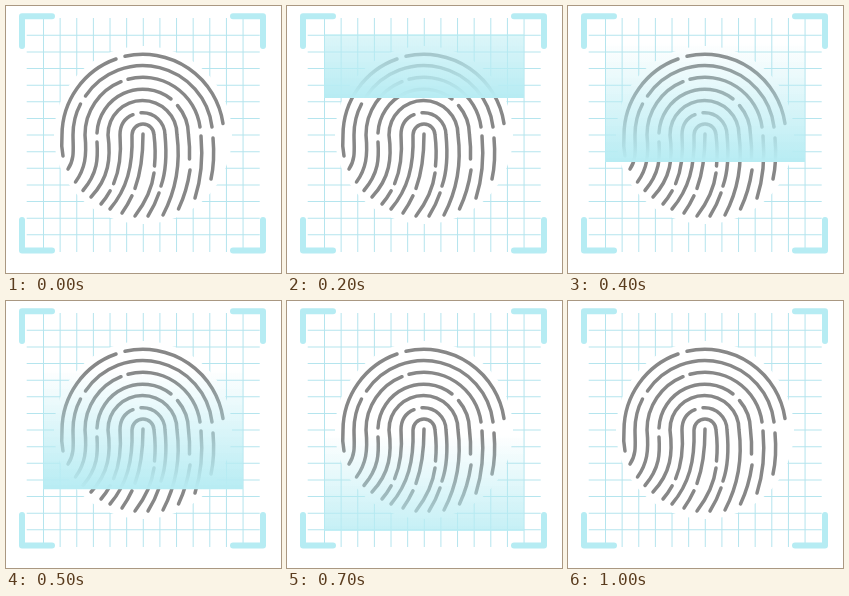
Write an HTML page that moves like this. It is 275x267 px and loops after 1200 ms.

```html
<!DOCTYPE html>
<html lang="en">
<head>
<meta charset="utf-8">
<title>Fingerprint scan</title>
<style>
  html, body { margin: 0; width: 100%; height: 100%; overflow: hidden; background: #fff; }
  svg { position: absolute; left: 0; top: 0; width: 275px; height: 267px; }
  path { fill: none; }
  .grid { stroke: #b5e5ee; }
  .corners { stroke: #b6ecf3; stroke-width: 6; stroke-linecap: round; stroke-linejoin: round; }
  .ridges { stroke: #878787; stroke-width: 3.5; stroke-linecap: round; }
  .window { position: absolute; left: 37px; top: 28px; width: 200px; height: 202px; overflow: hidden; }
  .beam {
    position: absolute; left: 0; top: -121.5px; width: 100%; height: 120px;
    background: linear-gradient(rgba(183, 236, 243, 0), rgb(183, 236, 243));
    animation: scan 1.2s steps(12, end) infinite;
  }
  @keyframes scan { to { transform: translateY(387px); } }
</style>
</head>
<body>
<svg viewBox="0 0 275 267">
  <!-- wide dashed strokes form the grid lines -->
  <g class="grid">
    <path d="M37 129H238" stroke-width="234" stroke-dasharray="1 15.63"/>
    <path d="M137.2 28.8V229.8" stroke-width="233" stroke-dasharray="1 15.63"/>
  </g>
  <circle cx="137" cy="129" r="89" fill="#fff"/>
  <path class="corners" d="M46 10.3H16V40M227 10.3H257V40M16 214V244.6H46M257 214V244.6H227"/>
  <g class="ridges">
    <path d="M57 150Q55 140 56 129A81 81 0 0 1 110 53M119 50.3A81 81 0 0 1 217 117.5"/>
    <path d="M62 163C69 153 67 142 67 129Q67 112 74.5 98M79.5 90A69.5 69.5 0 0 1 206 121M207 132Q209 155 205 173"/>
    <path d="M69.5 176C79 163 81 150 79 129A57.5 57.5 0 0 1 115 75.7M122 73.3A57.5 57.5 0 0 1 194 121M195 130Q198 164 189 192"/>
    <path d="M77 184.5C92 167 92 152 91 136M91 127A45.8 45.8 0 0 1 165 93M171.5 99.5A45.8 45.8 0 0 1 182.5 129Q184 141 183.5 153M184 164Q181 185 172.5 203"/>
    <path d="M85 191C103 172 105 152 102 129A34.5 34.5 0 0 1 171 129C175 160 168 188 157 209"/>
    <path stroke-dasharray="16 8 400" d="M95 198C112 178 116 155 114 129Q114 114 127 108.7"/>
    <path d="M135 106.7A22.5 22.5 0 0 1 159 129Q162 160 155 180M153 187Q149 199 142 210"/>
    <path d="M104 203C121 183 127 160 126 129A11 11 0 0 1 148 129Q150 145 148.5 160"/>
    <path d="M148 167C146 183 139 197 129 210"/>
    <path stroke-dasharray="20 8 400" d="M116 207C130 187 137 165 137 128"/>
  </g>
</svg>
<div class="window"><div class="beam"></div></div>
</body>
</html>
```
